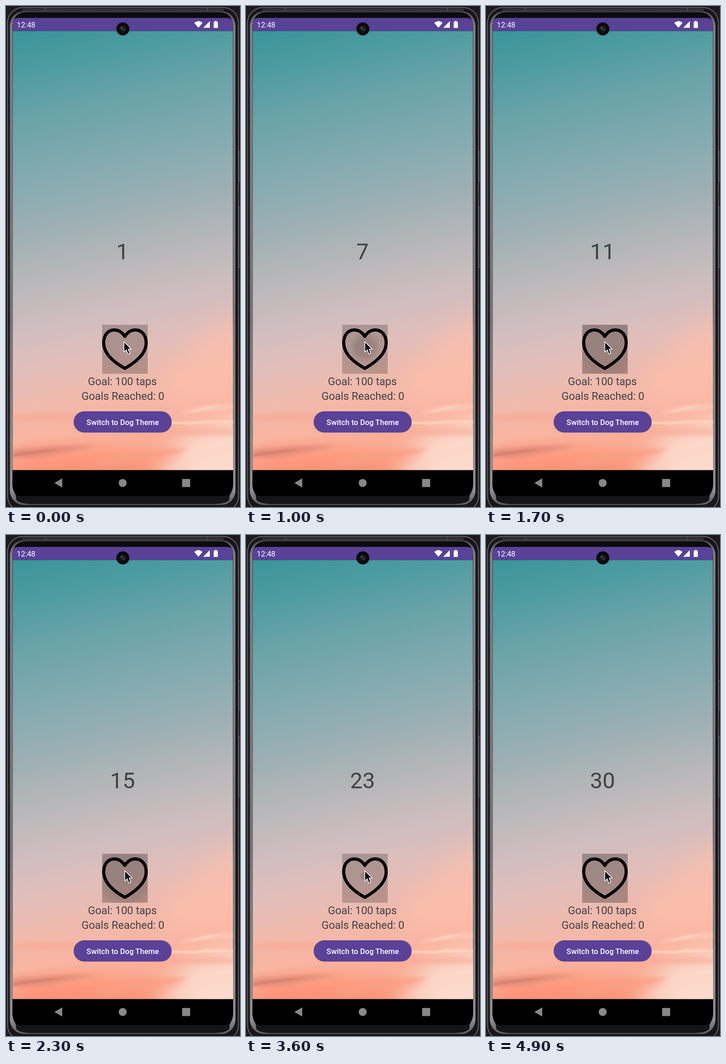
Recreate the animation shown at these times as an HTML page. Size 512 px wide and 1094 px high, loop 5 s.

```html
<!DOCTYPE html>
<html lang="en">
<head>
<meta charset="utf-8">
<title>Tap counter</title>
<style>
  html, body { margin: 0; width: 100%; height: 100%; overflow: hidden; background: #1d1a1f; }
  svg { display: block; width: 100vw; height: 100vh; }
  text { font-family: Roboto, sans-serif; }
  .mid { text-anchor: middle; fill: #414145; }
</style>
</head>
<body>
<svg viewBox="0 0 512 1094">
  <defs>
    <linearGradient id="sky" gradientUnits="userSpaceOnUse" x1="150" y1="35" x2="365" y2="1015">
      <stop offset="0" stop-color="#3b969c"/>
      <stop offset=".08" stop-color="#4c9ba0"/>
      <stop offset=".18" stop-color="#68a3a8"/>
      <stop offset=".32" stop-color="#85abb0"/>
      <stop offset=".43" stop-color="#9eb0b4"/>
      <stop offset=".53" stop-color="#b8b7ba"/>
      <stop offset=".63" stop-color="#cfbdbe"/>
      <stop offset=".72" stop-color="#e2beb9"/>
      <stop offset=".81" stop-color="#f2b9aa"/>
      <stop offset=".9" stop-color="#fab29c"/>
      <stop offset="1" stop-color="#faa78f"/>
    </linearGradient>
    <linearGradient id="metal" x1="0" y1="0" x2="0" y2="1">
      <stop offset="0" stop-color="#504f51"/>
      <stop offset=".03" stop-color="#807f81"/>
      <stop offset=".6" stop-color="#757476"/>
      <stop offset=".97" stop-color="#908f91"/>
      <stop offset="1" stop-color="#5c5b5d"/>
    </linearGradient>
    <radialGradient id="glow">
      <stop offset="0"/>
      <stop offset=".55" stop-opacity=".9"/>
      <stop offset="1" stop-opacity="0"/>
    </radialGradient>
    <radialGradient id="lens">
      <stop offset="0" stop-color="#34333c"/>
      <stop offset=".5" stop-color="#1b1a20"/>
      <stop offset="1" stop-color="#09090b"/>
    </radialGradient>
    <filter id="haze" x="-50%" y="-80%" width="200%" height="260%"><feGaussianBlur stdDeviation="26"/></filter>
    <filter id="soft" x="-20%" y="-80%" width="140%" height="260%"><feGaussianBlur stdDeviation="4"/></filter>
    <filter id="fine" x="-20%" y="-80%" width="140%" height="260%"><feGaussianBlur stdDeviation="1.2"/></filter>
    <clipPath id="photo"><rect x="14.500" y="54.500" width="482" height="959"/></clipPath>
    <clipPath id="pad"><rect x="210.500" y="696" width="99.500" height="107"/></clipPath>
  </defs>

  <!-- phone body -->
  <rect width="512" height="1094" fill="#1d1a1f"/>
  <path d="M512 318h-2v64h2M512 440h-2v131h2" fill="#111" stroke="#77767a"/>
  <rect x="3.500" y="3.500" width="505" height="1100" rx="33" fill="#171618" stroke="#656467" stroke-width="2"/>
  <path d="M36 8.500H476" stroke="#343336" stroke-width="5"/>
  <path d="M86 3v8M441 3v8" stroke="#666"/>
  <rect x="8.500" y="11.500" width="493.500" height="1078" rx="31" fill="url(#metal)"/>
  <path d="M14 48Q14 13.500 44 13.500H467Q497 13.500 497 48V1046Q490 1087.500 458 1087.500H53Q21 1087.500 14 1046Z" fill="#0c0c0e"/>
  <path d="M22 1070H489V1078Q482 1087 458 1087H53Q29 1087 22 1078Z" fill="#151517"/>

  <!-- wallpaper -->
  <g clip-path="url(#photo)">
    <rect x="14" y="54" width="483" height="960" fill="url(#sky)"/>
    <g filter="url(#haze)">
      <path d="M340 830Q420 710 540 660V870Q430 860 340 870Z" fill="#ffc0ac" opacity=".6"/>
      <path d="M0 985Q170 950 320 990V1040H0Z" fill="#ff8a6c" opacity=".8"/>
      <path d="M380 940L540 890V1060H360Z" fill="#fbe0d4" opacity=".9"/>
    </g>
    <g filter="url(#soft)">
      <path d="M14 893Q100 880 220 898L150 905Q70 902 14 910Z" fill="#faa58e" opacity=".5"/>
      <path d="M14 944Q90 920 180 934L120 944Q60 944 14 958Z" fill="#fcb9a4" opacity=".6"/>
      <path d="M14 970Q90 960 202 960Q130 974 98 980Q50 989 14 985Z" fill="#dc8975" opacity=".8"/>
      <path d="M190 1000Q280 960 400 968L340 987Q270 991 230 1008Z" fill="#fb9f85" opacity=".8"/>
      <path d="M280 930Q400 917 500 924V937Q390 937 290 943Z" fill="#f8ac96" opacity=".6"/>
      <path d="M385 885Q440 870 500 869V879Q440 884 385 891Z" fill="#fccfbc" opacity=".7"/>
      <path d="M330 1014Q400 976 500 953V980Q430 990 380 1014Z" fill="#fbd3c4" opacity=".5"/>
    </g>
    <g filter="url(#fine)">
      <path d="M320 903Q380 911 425 906Q460 902 500 906V911Q440 911 405 914Q360 914 320 907Z" fill="#fed3bd" opacity=".9"/>
      <path d="M405 885Q435 873 475 870Q450 879 405 888Z" fill="#fed5c1" opacity=".7"/>
      <path d="M14 979Q60 969 120 968Q70 978 14 984Z" fill="#cb7868" opacity=".45"/>
    </g>
  </g>

  <!-- status bar -->
  <path d="M14.500 54.500V36Q16 26 26 26H485Q495 26 496.500 36V54.500Z" fill="#594297"/>
  <text x="23.500" y="46.500" font-size="16.400" fill="#fff">12:48</text>
  <g fill="#fff">
    <path d="M412 37Q421 29 430 37L421 47.500Z"/>
    <path d="M446 33V47.500H431.500Z"/>
    <path d="M454.500 34.500h2.500v-2h4v2h2.500v13.500h-9Z"/>
  </g>
  <circle cx="255.700" cy="50" r="14.200" fill="#09090b"/>
  <circle cx="255.700" cy="50" r="9.500" fill="url(#lens)"/>
  <circle cx="252.500" cy="47" r="1.600" fill="#68676f"/>
  <circle cx="259.500" cy="52.500" r="1.200" fill="#45444d"/>

  <!-- navigation bar -->
  <path d="M14.500 1013.500H496.500V1050Q494 1070 476 1070H35Q17 1070 14.500 1050Z" fill="#000"/>
  <g fill="#888">
    <path d="M106 1041.500L123 1031.500V1051.500Z"/>
    <circle cx="255.300" cy="1041.500" r="8.700"/>
    <rect x="385.300" y="1032.700" width="17.700" height="17.700" rx="1"/>
  </g>

  <!-- app -->
  <text id="count" class="mid" x="255" y="553" font-size="48.500"></text>
  <g clip-path="url(#pad)">
    <rect x="210" y="696" width="101" height="108" opacity=".21"/>
    <circle id="ripple" cx="260" cy="745" fill="url(#glow)"/>
  </g>
  <path d="M260 721.500C254 712 246 707.300 237 707.300C223 707.300 213.700 719 213.700 735.500C213.700 760 238 779 260 791.300C282 779 306.700 760 306.700 735.500C306.700 719 297 707.300 283 707.300C274 707.300 266 712 260 721.500Z" fill="none" stroke="#000" stroke-width="6.800" stroke-linejoin="round"/>
  <text class="mid" x="254.600" y="828" font-size="23.500">Goal: 100 taps</text>
  <text class="mid" x="255.800" y="859.500" font-size="23.500">Goals Reached: 0</text>
  <rect x="148" y="885" width="214.500" height="46.500" rx="23.250" fill="#594297"/>
  <text x="255.500" y="915" font-size="16.400" font-weight="500" letter-spacing=".12" text-anchor="middle" fill="#fff">Switch to Dog Theme</text>
  <path id="cursor" d="M0 0V22.500L5.200 17.700L9 27L13 25.300L9.200 16.300H16Z" fill="#000" stroke="#fff" stroke-width="1.500" stroke-linejoin="round"/>
</svg>
<script>
  const LOOP = 5000, STEP = 100;
  // [time, value]; the whole part of a tap value is the count, the rest is the ripple phase
  const taps = [[0, 1.95], [500, 4.75], [1000, 7.35], [1700, 11.7], [2900, 19.55], [3600, 23.15], [4900, 30.8]];
  const cursorX = [[0, 258], [300, 260], [4900, 260]];
  const cursorY = [[0, 733], [500, 735], [800, 733], [4900, 733]];
  const [count, ripple, cursor] = ['count', 'ripple', 'cursor'].map(id => document.getElementById(id));

  function lerpKeys(keys, t) {
    const i = Math.max(1, keys.findIndex(k => k[0] >= t));
    const [t0, a] = keys[i - 1], [t1, b] = keys[i];
    return a + (b - a) * (t - t0) / (t1 - t0);
  }

  function draw(ms) {
    const t = Math.floor((ms % LOOP) / STEP) * STEP;
    const tap = lerpKeys(taps, t);
    const phase = tap % 1;
    count.textContent = Math.floor(tap);
    ripple.setAttribute('r', 80 * phase + 150 * phase ** 3);
    ripple.setAttribute('opacity', 0.14 * Math.min(1, (1 - phase) / 0.3));
    cursor.setAttribute('transform', `translate(${lerpKeys(cursorX, t)} ${lerpKeys(cursorY, t)})`);
  }

  const start = performance.now();
  function tick() {
    draw(performance.now() - start);
    requestAnimationFrame(tick);
  }
  tick();
</script>
</body>
</html>
```
